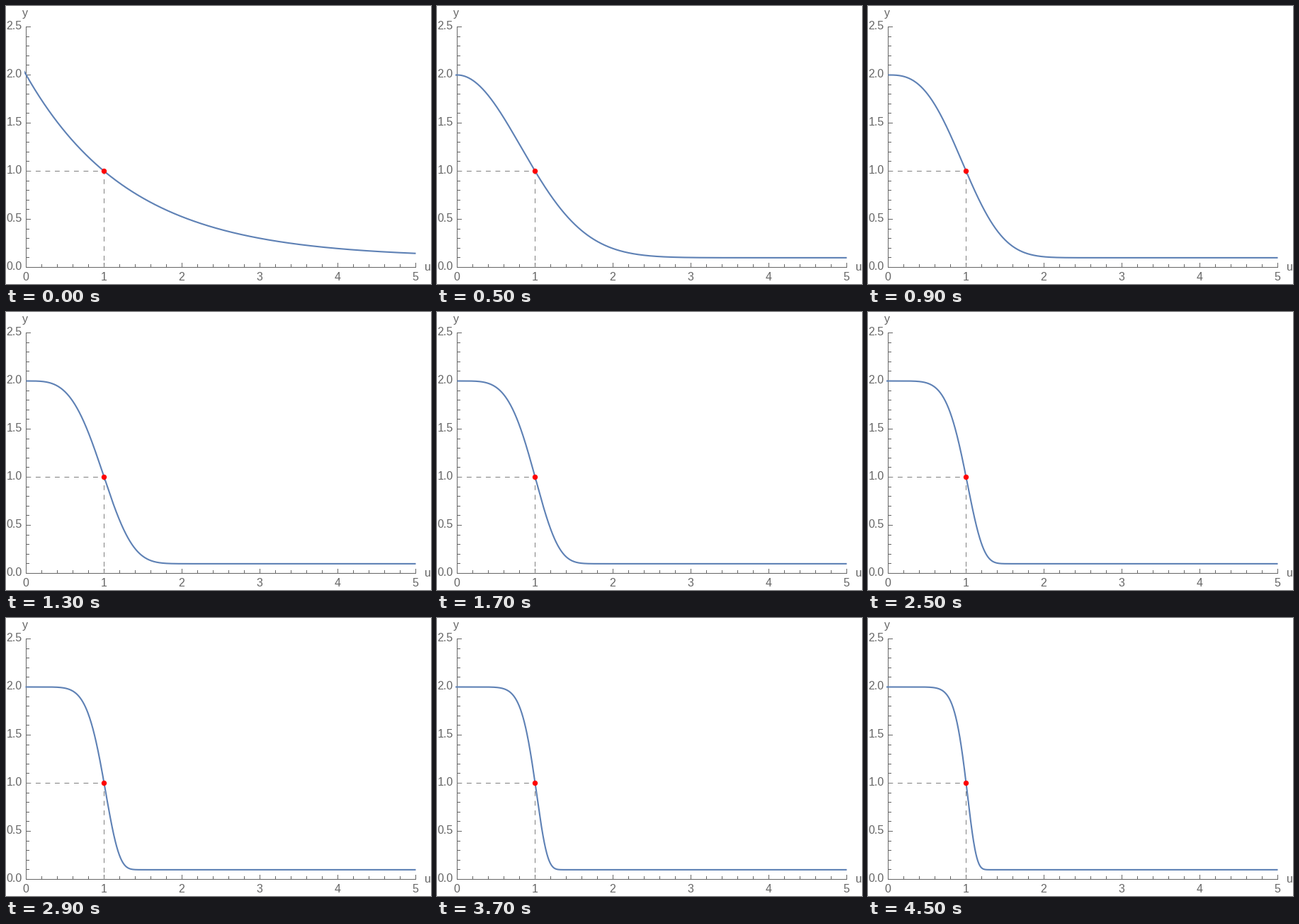
A matplotlib script that plays this animation: 600 by 393 pixels, repeating every 4600 ms.

```python
import matplotlib.pyplot as plt
import numpy as np
from matplotlib.animation import FuncAnimation
from matplotlib.patches import Circle, Rectangle

W, H, DPI = 600, 393, 100
FRAMES, INTERVAL = 46, 100
X0, Y0 = 28.5, 369.5        # pixel position of the plot's zero point
SX, SY = 110, 136           # pixels per unit
PX = 72 / DPI               # one pixel in points
GRAY, BLUE = "#666666", "#5e81b5"
TOP, BASE, HALF = 2.0, 0.1, 1.0

plt.rcParams["font.family"] = "Liberation Sans"


def to_x(u):
    return X0 + SX * u


def to_y(v):
    return Y0 - SY * v


fig = plt.figure(figsize=(W / DPI, H / DPI), dpi=DPI, facecolor="white")
ax = fig.add_axes([0, 0, 1, 1])
ax.set_xlim(0, W)
ax.set_ylim(H, 0)
ax.axis("off")


def hairline(xs, ys, **kw):
    # snapping adds the half pixel back, so the line fills one pixel row
    style = dict(color=GRAY, lw=PX, solid_capstyle="projecting", zorder=1)
    ax.plot(np.array(xs) - 0.5, np.array(ys) - 0.5, **{**style, **kw})


def label(x, y, text, ha="center"):
    ax.text(x, y, text, ha=ha, va="baseline", color=GRAY, fontsize=16 * PX)


def draw_axes():
    hairline([X0, to_x(5)], [Y0, Y0])
    hairline([X0, X0], [Y0, to_y(2.5)])
    for i in range(26):
        major = i % 5 == 0
        size = 6 if major else 4
        x, y = to_x(i / 5), to_y(i / 10)
        hairline([x, x], [Y0, Y0 - size])
        hairline([X0, X0 + size], [y, y])
        if major:
            label(x - 0.5, 388, str(i // 5))
            label(22.6, y + 3.7, f"{i / 10:.1f}", ha="right")
    label(595, 374, "u")
    label(27, 15, "y")


def hill(u, n):
    # real part of u**n, so negative u works for any exponent
    power = np.where(u < 0, np.cos(np.pi * n), 1) * np.abs(u) ** n
    ratio = (HALF - BASE) / (TOP - BASE)
    return BASE + (TOP - BASE) * ratio ** power


def left_end(n):
    # left of zero the curve is real for whole n, else only very near zero
    return -0.05 if n == int(n) else -min(0.05, 1e-14 ** (1 / n))


draw_axes()
curve, = ax.plot([], [], color=BLUE, lw=2.1 * PX, solid_capstyle="butt",
                 zorder=2)
curve.set_clip_path(Rectangle((26, 0), 553, H, transform=ax.transData))
hairline([X0, to_x(1), to_x(1)], [to_y(1), to_y(1), Y0], color="#7f7f7f",
         dashes=(6.8, 6.7), dash_capstyle="butt", zorder=3)
ax.add_patch(Circle((to_x(1), to_y(1)), 3.7, color="red", lw=0, zorder=4))


def update(i):
    n = round(1 + 0.2 * i, 1)
    u = np.linspace(left_end(n), 5, 1200)
    curve.set_data(to_x(u), to_y(hill(u, n)))
    return [curve]


anim = FuncAnimation(fig, update, frames=FRAMES, interval=INTERVAL,
                     repeat=True, repeat_delay=0, blit=False)
plt.show()
```
